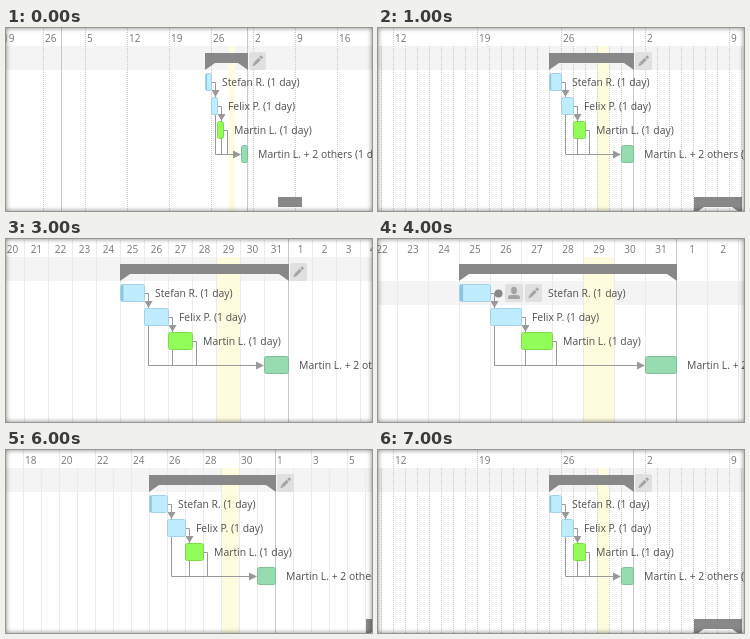
Animation of 366 by 183 pixels, one loop 8000 ms. Source, as an HTML page with a canvas:

```html
<!DOCTYPE html>
<html lang="en">
<head>
<meta charset="utf-8">
<title>Zooming Gantt chart</title>
<style>
  html, body { margin: 0; width: 100%; height: 100%; overflow: hidden; background: #fff; }
  canvas { display: block; width: 100%; height: 100%; }
  body::after {
    content: ""; position: fixed; inset: 0; pointer-events: none;
    box-shadow: inset 0 0 5px rgba(0, 0, 0, .5);
  }
</style>
</head>
<body>
<canvas id="stage" width="366" height="183"></canvas>
<script>
const ctx = document.getElementById('stage').getContext('2d');
const WIDTH = 366, HEIGHT = 183, HEADER = 18, ROW = 24;
const GRAY = '#888', LINK = '#999';

// origin: x of 25 March; labelStep: days between header labels
const zooms = [
  { day: 6, origin: 199, labelStep: 7, lineStep: 7 },
  { day: 12, origin: 171, labelStep: 7, lineStep: 1 },
  { day: 18, origin: 143, labelStep: 2, lineStep: 1 },
  { day: 24, origin: 114, labelStep: 1, lineStep: 1 },
  { day: 31, origin: 81, labelStep: 1, lineStep: 1, taskHover: true }
];
const sequence = [0, 1, 2, 3, 4, 3, 2, 1];

const blue = ['#bfecff', '#9fd3ea'];
const tasks = [
  { start: 0, label: 'Stefan R. (1 day)', colors: blue, progress: 0.1 },
  { start: 1, label: 'Felix P. (1 day)', colors: blue },
  { start: 2, label: 'Martin L. (1 day)', colors: ['#92fd58', '#7cdc48'] },
  { start: 6, label: 'Martin L. + 2 others (1 day)', colors: ['#97dbb0', '#7cc097'] }
];

const mod = (a, n) => ((a % n) + n) % n;
const rowMiddle = row => 54 + row * ROW;

function rect(x, y, w, h, color) {
  ctx.fillStyle = color;
  ctx.fillRect(x, y, w, h);
}

function polygon(points, color) {
  ctx.beginPath();
  points.forEach(([x, y]) => ctx.lineTo(x, y));
  ctx.closePath();
  ctx.fillStyle = color;
  ctx.fill();
}

function path(points, color) {
  ctx.beginPath();
  points.forEach(([x, y]) => ctx.lineTo(x + 0.5, y + 0.5));
  ctx.strokeStyle = color;
  ctx.lineWidth = 1;
  ctx.stroke();
}

function gridLine(x, top, color, dotted) {
  if (!dotted) return rect(x, top, 1, HEIGHT - top, color);
  for (let y = top; y < HEIGHT; y += 2) rect(x, y, 1, 1, color);
}

function roundBox(x, y, w, h, r, fill, stroke) {
  ctx.beginPath();
  ctx.roundRect(x, y, w, h, r);
  ctx.fillStyle = fill;
  ctx.fill();
  if (stroke) {
    ctx.strokeStyle = stroke;
    ctx.lineWidth = 1;
    ctx.stroke();
  }
}

function text(str, x, y, color, size, align = 'left') {
  ctx.font = `${size}px "Open Sans", "Noto Sans", sans-serif`;
  ctx.textAlign = align;
  ctx.fillStyle = color;
  ctx.fillText(str, x, y);
}

function drawGrid(zoom, toX) {
  const first = Math.floor(-zoom.origin / zoom.day) - 7;
  const last = Math.ceil((WIDTH - zoom.origin) / zoom.day);
  const weekly = zoom.labelStep === 7, daily = zoom.labelStep === 1;
  for (let i = first; i <= last; i++) {
    const x = toX(i);
    const date = new Date(2018, 2, 25 + i).getDate();
    // weeks start on Monday 26 March
    const labelled = mod(i - 1, zoom.labelStep) === 0;
    if (date === 1) {
      gridLine(x, 0, '#c8c8c8');
    } else if (mod(i - 1, zoom.lineStep) === 0) {
      gridLine(x, labelled ? 0 : HEADER, weekly ? '#c8c8c8' : '#ebebeb', weekly);
    }
    if (labelled) {
      const labelX = daily ? x + zoom.day / 2 + 0.5 : x + 2;
      text(date, labelX, 14, '#777', 10, daily ? 'center' : 'left');
    }
  }
}

function drawGroup(left, right, y) {
  rect(left, y, right - left + 1, 10, GRAY);
  if (right - left < 30) return;
  polygon([[left, y + 10], [left, y + 17], [left + 10, y + 10]], GRAY);
  polygon([[right + 1, y + 10], [right + 1, y + 17], [right - 9, y + 10]], GRAY);
}

function drawPencil(x, y) {
  roundBox(x, y, 17, 18, 2, '#e0e0e0');
  ctx.save();
  ctx.translate(x + 8.5, y + 9);
  ctx.rotate(-Math.PI / 4);
  rect(-4, -1.5, 7, 3, '#a4a4a4');
  rect(4, -1.5, 2.5, 3, '#a4a4a4');
  polygon([[-4, -1.5], [-7.5, 0], [-4, 1.5]], '#a4a4a4');
  ctx.restore();
}

function drawPerson(x, y) {
  roundBox(x, y, 18, 18, 2, '#e0e0e0');
  ctx.fillStyle = '#a4a4a4';
  ctx.beginPath();
  ctx.ellipse(x + 9, y + 6.5, 3, 3.7, 0, 0, Math.PI * 2);
  ctx.fill();
  roundBox(x + 3, y + 11, 12, 4, [3, 3, 0, 0], '#a4a4a4');
}

function drawLinks(toX) {
  const target = toX(6), bottom = rowMiddle(3);
  for (let row = 0; row < 3; row++) {
    const end = toX(row + 1), x = end + 4, y = rowMiddle(row);
    path([[end, y], [x, y], [x, bottom], [target - 5, bottom]], LINK);
    if (row < 2) {
      const tip = y + 15;
      polygon([[x - 3.5, tip - 7], [x + 4.5, tip - 7], [x + 0.5, tip]], LINK);
    }
  }
  polygon([[target - 8, bottom - 3.5], [target - 8, bottom + 4.5], [target, bottom + 0.5]], LINK);
}

function drawTask(task, row, zoom, toX) {
  const x = toX(task.start), y = rowMiddle(row) - 9;
  const end = x + zoom.day;
  const hovered = zoom.taskHover && row === 0;
  const [fill, border] = task.colors;
  roundBox(x + 0.5, y + 0.5, zoom.day, 17, 2, fill, border);
  if (task.progress) rect(x + 1, y + 1, Math.max(1, zoom.day * task.progress), 16, '#8fc4dd');
  if (hovered) {
    ctx.beginPath();
    ctx.arc(end + 8.5, y + 9.5, 4, 0, Math.PI * 2);
    ctx.fillStyle = GRAY;
    ctx.fill();
    drawPerson(end + 15, y);
    drawPencil(end + 35, y);
  }
  text(task.label, end + (hovered ? 58 : 11), y + 13, '#505050', 10.4);
}

function draw(zoom) {
  const toX = day => zoom.origin + day * zoom.day;
  rect(0, 0, WIDTH, HEIGHT, '#fff');
  rect(0, zoom.taskHover ? HEADER + ROW : HEADER, WIDTH, ROW, '#f4f4f4');
  rect(toX(4), HEADER, zoom.day, HEIGHT, '#fefcde');
  drawGrid(zoom, toX);
  drawGroup(toX(0), toX(7), 25);
  drawGroup(toX(12) + 1, toX(16), 169);
  if (!zoom.taskHover) drawPencil(toX(7) + 2, 24);
  drawLinks(toX);
  tasks.forEach((task, row) => drawTask(task, row, zoom, toX));
}

function frame() {
  const step = Math.floor(performance.now() / 1000) % sequence.length;
  draw(zooms[sequence[step]]);
  requestAnimationFrame(frame);
}
frame();
</script>
</body>
</html>
```
